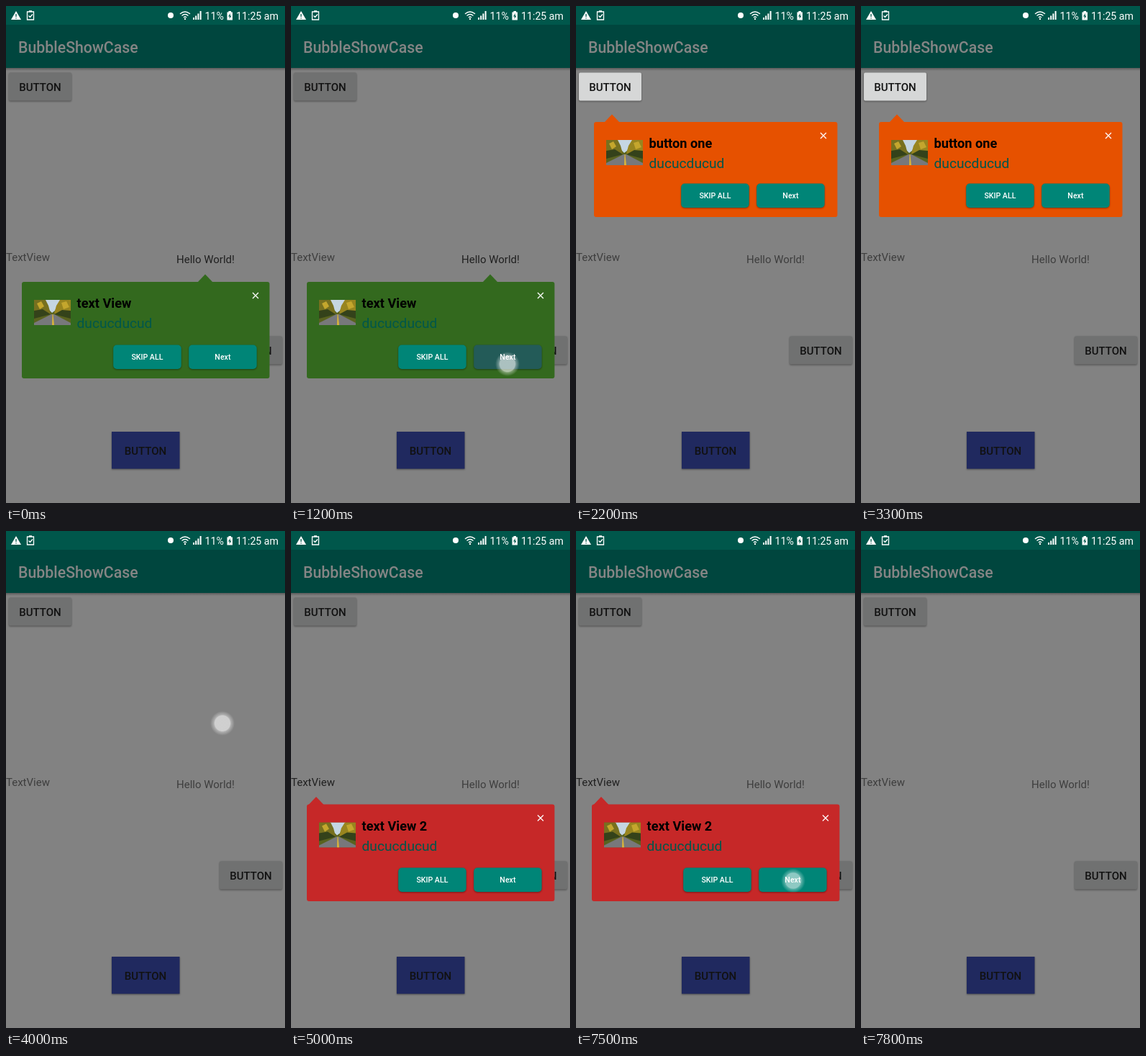
An HTML page that plays this animation: 388 px wide and 690 px high, repeating every 8 s.

```html
<!DOCTYPE html>
<html lang="en">
<head>
<meta charset="utf-8">
<title>BubbleShowCase</title>
<style>
  html, body { margin: 0; width: 100%; height: 100%; overflow: hidden; background: #828282; }
  svg { display: block; width: 100%; height: 100%; }
  text { font-family: Roboto, "Noto Sans", sans-serif; }
  .btn { font-size: 15px; font-weight: 500; text-anchor: middle; fill: #111; }
  .label { font-size: 15px; fill: #3e3e3e; }
  .status { font-size: 14.2px; fill: #fff; }
  .title { font-size: 18.2px; font-weight: 700; }
  .sub { font-size: 19.2px; fill: #00574b; }
  .act { font-size: 10.6px; font-weight: 500; text-anchor: middle; fill: #fff; }
  .shade { filter: drop-shadow(0 1px 1px #0006); }
  .line { fill: none; stroke: #fff; stroke-width: 1.3; }
</style>
</head>
<body>
<svg viewBox="0 0 388 690">
  <defs>
    <linearGradient id="drop" x2="0" y2="1">
      <stop stop-color="#000" stop-opacity=".3"/>
      <stop offset="1" stop-color="#000" stop-opacity="0"/>
    </linearGradient>
    <radialGradient id="glow">
      <stop offset=".62" stop-color="#fff" stop-opacity=".62"/>
      <stop offset=".7" stop-color="#fff" stop-opacity=".36"/>
      <stop offset="1" stop-color="#fff" stop-opacity="0"/>
    </radialGradient>
    <symbol id="photo" viewBox="0 0 51 35">
      <rect width="51" height="35" fill="#59621f"/>
      <path d="M15 0H37L29 15L25 18L20 13Z" fill="#c5d6e2"/>
      <path d="M0 0H16L20 8L23 19L0 24Z" fill="#77701f"/>
      <path d="M51 0H36L31 8L28 19L51 24Z" fill="#98851f"/>
      <path d="M4 5L10 2L14 9L8 13ZM38 4L45 2L49 10L41 13Z" fill="#c4a62d"/>
      <path d="M0 15L12 13L23 20L0 26ZM51 15L39 14L28 20L51 26Z" fill="#34421a"/>
      <path d="M24 20H28L51 32V35H0V32Z" fill="#77787b"/>
      <path d="M25.5 20H26.5L28 35H25Z" fill="#d9b43b"/>
    </symbol>
  </defs>

  <rect width="388" height="690" fill="#828282"/>
  <rect y="86" width="388" height="4" fill="url(#drop)"/>
  <rect y="26" width="388" height="60" fill="#00463e"/>
  <rect width="388" height="26" fill="#00574b"/>
  <text x="17" y="64.5" font-size="21.3" font-weight="500" fill="#858585">BubbleShowCase</text>

  <path d="M14 7L21 19H7Z" fill="#fff"/>
  <path d="M14 11V15M14 16.3V17.6" stroke="#00574b" stroke-width="1.3"/>
  <path class="line" d="M29.5 8H38.5V19H29.5ZM31.5 13.5L33.5 15.5L37 11.5M32 7H36"/>
  <circle cx="229" cy="13" r="4" fill="#fff"/>
  <path class="line" d="M242 11Q249 5 256 11M244.5 13.5Q249 9.5 253.5 13.5M247 16Q249 14 251 16"/>
  <path d="M248 17H250V19H248ZM260 16H262V19H260ZM263.2 13.5H265.2V19H263.2ZM266.4 10.5H268.4V19H266.4ZM269.6 7H271.6V19H269.6Z" fill="#fff"/>
  <path d="M309.5 7H313V8.5H315V19.5H307.5V8.5H309.5Z" fill="#fff"/>
  <path d="M312 10L309 14.5H311L310.5 18L313.5 13.5H311.5Z" fill="#00574b"/>
  <text class="status" x="276.5" y="18.5">11%</text>
  <text class="status" x="320" y="18.5">11:25 am</text>

  <rect id="first" class="shade" x="4" y="92.5" width="87" height="39" rx="2"/>
  <text class="btn" x="47.5" y="118">BUTTON</text>
  <text id="view" class="label" x="0" y="353.5">TextView</text>
  <text id="hello" class="label" x="237" y="356.5">Hello World!</text>
  <rect class="shade" x="297" y="458.5" width="87" height="39" rx="2" fill="#707171"/>
  <text class="btn" x="340.5" y="483.5">BUTTON</text>
  <rect class="shade" x="147" y="591" width="94.5" height="51.5" fill="#20295f"/>
  <text class="btn" x="194" y="622.5">BUTTON</text>

  <g id="bubbles"></g>
  <circle id="touch" r="17" fill="url(#glow)"/>
</svg>
<script>
const $ = id => document.getElementById(id);
const LOOP = 8000, GROW = 200;

// lit: target highlighted, show: bubble starts to grow, tap: finger down
const steps = [
  { x: 22, y: 383, w: 344.5, h: 134, tip: 277, color: '#33691e', title: 'text View',
    lit: -GROW, show: -GROW, tap: 1100, touch: [301, 497] },
  { x: 25, y: 161, w: 338.5, h: 132, tip: 50, color: '#e65100', title: 'button one',
    lit: 2000, show: 2000, tap: 3800, touch: [301, 267] },
  { x: 22, y: 379.5, w: 344.5, h: 134.5, tip: 35, color: '#c62828', title: 'text View 2',
    lit: 4700, show: 4800, tap: 7500, touch: [302, 485.5] },
];

function action(x, y, label) {
  return `<rect class="shade" x="${x}" y="${y}" width="94.5" height="33.5" rx="5" fill="#008577"/>
    <text class="act" x="${x + 47.2}" y="${y + 20.5}">${label}</text>`;
}

function bubble({ x, y, w, h, tip, color, title }) {
  const right = x + w, next = right - 112.3, row = y + h - 46.5;
  const cx = right - 19.5, cy = y + 19;
  return `<g>
    <path d="M${tip - 11} ${y + 1}L${tip} ${y - 10.5}L${tip + 11} ${y + 1}Z" fill="${color}"/>
    <rect x="${x}" y="${y}" width="${w}" height="${h}" rx="3" fill="${color}"/>
    <use href="#photo" x="${x + 17}" y="${y + 25}" width="51" height="35"/>
    <text class="title" x="${x + 76.5}" y="${y + 36}">${title}</text>
    <text class="sub" x="${x + 76.5}" y="${y + 64}">ducucducud</text>
    ${action(next - 105, row, 'SKIP ALL')}
    <g class="next">${action(next, row, 'Next')}</g>
    <path class="line" d="M${cx - 4} ${cy - 4}l8 8m0 -8l-8 8"/>
  </g>`;
}

$('bubbles').innerHTML = steps.map(bubble).join('');
const groups = [...$('bubbles').children];

const ease = p => (1 - Math.cos(Math.PI * p)) / 2;
const clamp = p => Math.max(0, Math.min(1, p));

function draw(t) {
  const lit = steps.map(s => t >= s.lit && t < s.tap + 200);
  $('hello').style.fill = lit[0] ? '#202020' : '';
  $('first').style.fill = lit[1] ? '#d6d7d7' : '#707171';
  $('view').style.fill = lit[2] ? '#202020' : '';

  $('touch').style.display = 'none';
  steps.forEach((s, i) => {
    const g = groups[i], k = ease(clamp((t - s.show) / GROW));
    const cx = s.x + s.w / 2, cy = s.y + s.h / 2 - 5;
    g.style.display = lit[i] && k > 0 ? '' : 'none';
    g.setAttribute('transform', `translate(${cx * (1 - k)} ${cy * (1 - k)}) scale(${k})`);
    g.querySelector('.next rect').style.fill = t >= s.tap + 100 ? '#235b58' : '';

    const held = t - s.tap;
    if (held >= 0 && held < 300) {
      $('touch').style.display = '';
      $('touch').setAttribute('cx', s.touch[0]);
      $('touch').setAttribute('cy', s.touch[1]);
      $('touch').style.opacity = held < 100 ? .9 : 1;
    }
  });
}

const start = performance.now();
function tick() {
  draw((performance.now() - start) % LOOP);
  requestAnimationFrame(tick);
}
tick();
</script>
</body>
</html>
```
